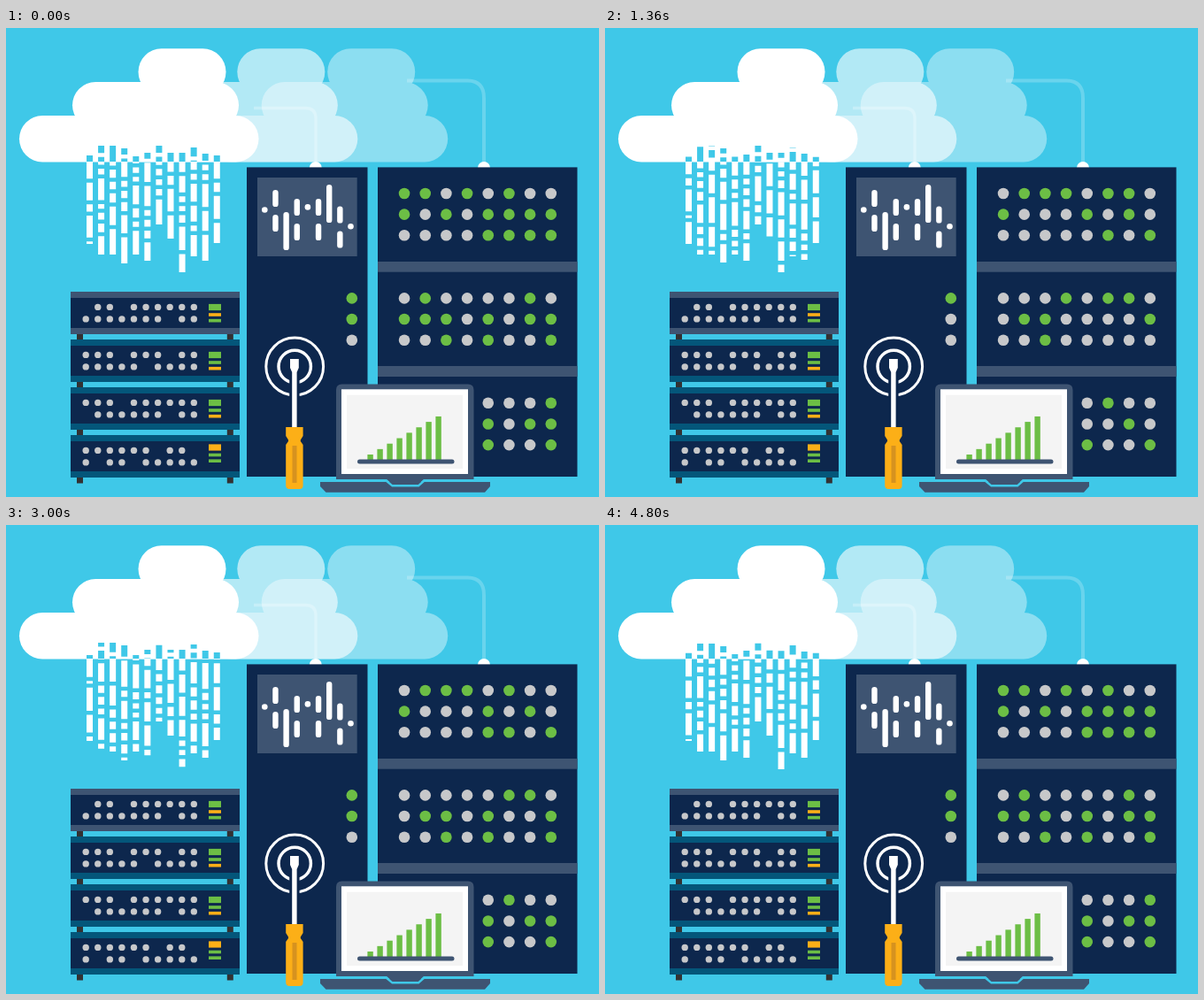
Write an HTML page that moves like this. It is 670 by 530 pixels and loops after 4840 ms.

```html
<!DOCTYPE html>
<html lang="en">
<head>
<meta charset="utf-8">
<title>Cloud servers</title>
<style>
  html, body { margin: 0; width: 100%; height: 100%; overflow: hidden; background: #3fc8e8; }
  svg { display: block; width: 670px; height: 530px; }
</style>
</head>
<body>
<svg id="stage" viewBox="0 0 670 530" fill="none"></svg>
<script>
const LOOP = 4840, STEP = 40;
const SKY = '#3fc8e8', NAVY = '#0d274d', SLATE = '#3e5472', TEAL = '#04567a',
      GRAY = '#c7c8ca', GREEN = '#6cbe45', ORANGE = '#fcaf17', WHITE = '#fff';

const stage = document.getElementById('stage');

function add(tag, attrs, parent = stage) {
  const el = document.createElementNS('http://www.w3.org/2000/svg', tag);
  for (const k in attrs) el.setAttribute(k, attrs[k]);
  parent.appendChild(el);
  return el;
}
const rect = (x, y, width, height, fill, rx = 0, parent) =>
  add('rect', { x, y, width, height, fill, rx }, parent);
const dot = (cx, cy, r, fill) => add('circle', { cx, cy, r, fill });
const ring = (r, w) =>
  add('circle', { cx: 326.2, cy: 382.5, r, stroke: WHITE, 'stroke-width': w });
const path = (d, attrs) => add('path', { d, ...attrs });

let seed = 7;
function random(min, max) {
  seed = (seed * 16807) % 2147483647;
  return min + (max - min) * seed / 2147483647;
}

// Clouds and cables
function cloud(x, opacity) {
  const g = add('g', { opacity });
  rect(x, 99, 270.5, 52.5, WHITE, 26.2, g);
  rect(x + 60, 61, 188, 52.5, WHITE, 26.2, g);
  rect(x + 134.5, 23.3, 99, 52.5, WHITE, 26.2, g);
}
cloud(228.7, 0.4);
cloud(126.8, 0.6);
path('M280 90.5H338Q350 90.5 350 102V157', { stroke: WHITE, 'stroke-width': 3.5, opacity: 0.25 });
path('M453 59.5H522Q540 60 540 79V157', { stroke: WHITE, 'stroke-width': 4, opacity: 0.22 });
cloud(15, 1);
dot(349.8, 158, 7, WHITE);
dot(540, 158, 7, WHITE);

// Data rising into the cloud: blue inside it, white below
const edge = add('linearGradient', {
  id: 'edge', gradientUnits: 'userSpaceOnUse', x1: 0, y1: 0, x2: 0, y2: 303
}, add('defs', {}));
add('stop', { offset: 0.5, 'stop-color': SKY }, edge);
add('stop', { offset: 0.5, 'stop-color': WHITE }, edge);

function dashes(length) {
  const list = [];
  let left = length;
  while (left > 36) {
    const dash = random(0, 1) < 0.4 ? random(18, 27) : random(5, 11);
    list.push(dash, 4.5);
    left -= dash + 4.5;
  }
  return [...list, left - 4.5, 4.5];
}
const spans = [[144, 244], [133, 256], [133, 256], [136, 266], [145, 256], [141, 263],
               [133, 222], [141, 238], [141, 276], [135, 258], [142, 263], [144, 243]];
const rain = spans.map(([top, bottom], i) => {
  const period = bottom - top + 4.5;
  const el = path(`M${94.5 + 13.07 * i} ${top}V${bottom}`, {
    stroke: 'url(#edge)', 'stroke-width': 7, 'stroke-dasharray': dashes(period).join(' ')
  });
  return { el, period };
});

// Small servers: lit columns of both rows, and the light bars
const racks = [
  { rows: ['12456789', '012345689'], lights: [GREEN, ORANGE, GREEN], lightY: 13.9 },
  { rows: ['01245689', '012346789'], lights: [GREEN, GREEN, ORANGE], lightY: 13.9 },
  { rows: ['012456789', '12345689'], lights: [GREEN, GREEN, ORANGE], lightY: 13.9 },
  { rows: ['01234578', '02356789'], lights: [ORANGE, GREEN, GREEN], lightY: 10.4 }
];
racks.forEach(({ rows, lights, lightY }, i) => {
  const y = 298 + 54 * i;
  rect(80, y + 48, 7, 6.5, '#333132');
  rect(249.8, y + 48, 7, 6.5, '#333132');
  rect(73, y, 191, 48, i ? TEAL : SLATE);
  rect(73, y + 7, 191, 34, NAVY);
  rows.forEach((row, r) => {
    for (const c of row) dot(90.2 + 13.57 * c, y + 17.4 + 13.5 * r, 3.7, GRAY);
  });
  lights.forEach((color, n) =>
    rect(229, y + lightY + (n && 3.6 + 6.7 * n), 14, n ? 3.6 : 7.2, color));
});

// Cabinets
rect(272, 157.4, 136.5, 349.6, NAVY);
rect(420, 157.4, 225.5, 349.6, NAVY);
rect(420, 264, 225.5, 11.7, SLATE);
rect(420, 382, 225.5, 12, SLATE);
rect(284, 169, 112.7, 89, SLATE);

// Equaliser: dots, split bars and long bars take turns
const bar = (x, y, half) => path(`M${x} ${y - half}V${y + half}`,
  { stroke: WHITE, 'stroke-width': 6.4, 'stroke-linecap': 'round' });
[205.5, 206.5, 229.5, 216.5, 202.4, 216.5, 198.5, 225, 224.3].forEach((y, i) => {
  const x = 292.3 + 12.15 * i;
  if (i % 2) { bar(x, y - 14, 6.4); bar(x, y + 14, 6.4); }
  else if (i % 4) bar(x, y, 18.4);
  else dot(x, y, 3.3, WHITE);
});

// Lamps: # on, . off, + goes dark for a while, - lights up for a while
const blinking = [];
function lamp(x, y, kind) {
  const el = dot(x, y, 6.3, kind === '#' ? GREEN : GRAY);
  if (kind === '+' || kind === '-')
    blinking.push({ el, rest: kind === '+',
      from: random(0.13, 0.28) * LOOP, to: random(0.5, 0.76) * LOOP });
}
const lampY = r => 187 + 23.65 * (r % 3) + 118.4 * Math.floor(r / 3);
['+#-#.#-.', '#.+.#+#+', '....+#+#',
 '.+.-.-#.', '+##.+.+#', '..#.+..+',
 '.-.+', '+.#+', '#..#'].forEach((row, r) => {
  [...row].forEach((kind, c) => lamp(615.8 - 23.68 * (row.length - 1 - c), lampY(r), kind));
});
[...'#+.'].forEach((kind, i) => lamp(390.8, lampY(3 + i), kind));

// Screwdriver
ring(32.4, 3);
ring(18.2, 3.5);
path('M321 374H330.8V384L328.6 389V452H323.2V389L321 384Z',
  { fill: WHITE, stroke: NAVY, 'stroke-width': 6, 'paint-order': 'stroke' });
path('M316.2 451H335.6V461L332.8 465.5V467L335.6 471V517Q335.6 521 331.6 521H320.2Q316.2 521 316.2 517V471L319 467V465.5L316.2 461Z',
  { fill: ORANGE });
rect(323.5, 472, 5, 42, '#d6921f');

// Laptop
path('M355 513H547V518L541 524.7H361.5L355 518Z', { fill: SLATE });
path('M373 510V409Q373 402.5 379.5 402.5H522Q528.5 402.5 528.5 409V510H472L465.5 516H437L430 510Z',
  { fill: SLATE });
path('M373 511.5H429.5L436.5 517.3H466L472.5 511.5H528.5', { stroke: SKY, 'stroke-width': 2.4 });
rect(379, 408.3, 143, 95.7, WHITE);
rect(385, 414.7, 131, 83.3, '#f4f4f4');
for (let i = 0; i < 8; i++) {
  const height = 7 + 6.15 * i;
  rect(408.4 + 11 * i, 489 - height, 6.4, height, GREEN);
}
path('M399.5 490H504', { stroke: SLATE, 'stroke-width': 5, 'stroke-linecap': 'round' });

function draw(now) {
  const t = Math.floor(now % LOOP / STEP) * STEP;
  for (const { el, period } of rain)
    el.setAttribute('stroke-dashoffset', period * t / LOOP);
  for (const { el, rest, from, to } of blinking) {
    const flipped = t >= from && t < to;
    el.setAttribute('fill', rest !== flipped ? GREEN : GRAY);
  }
}

const start = performance.now();
function tick() {
  draw(performance.now() - start);
  requestAnimationFrame(tick);
}
tick();
</script>
</body>
</html>
```
